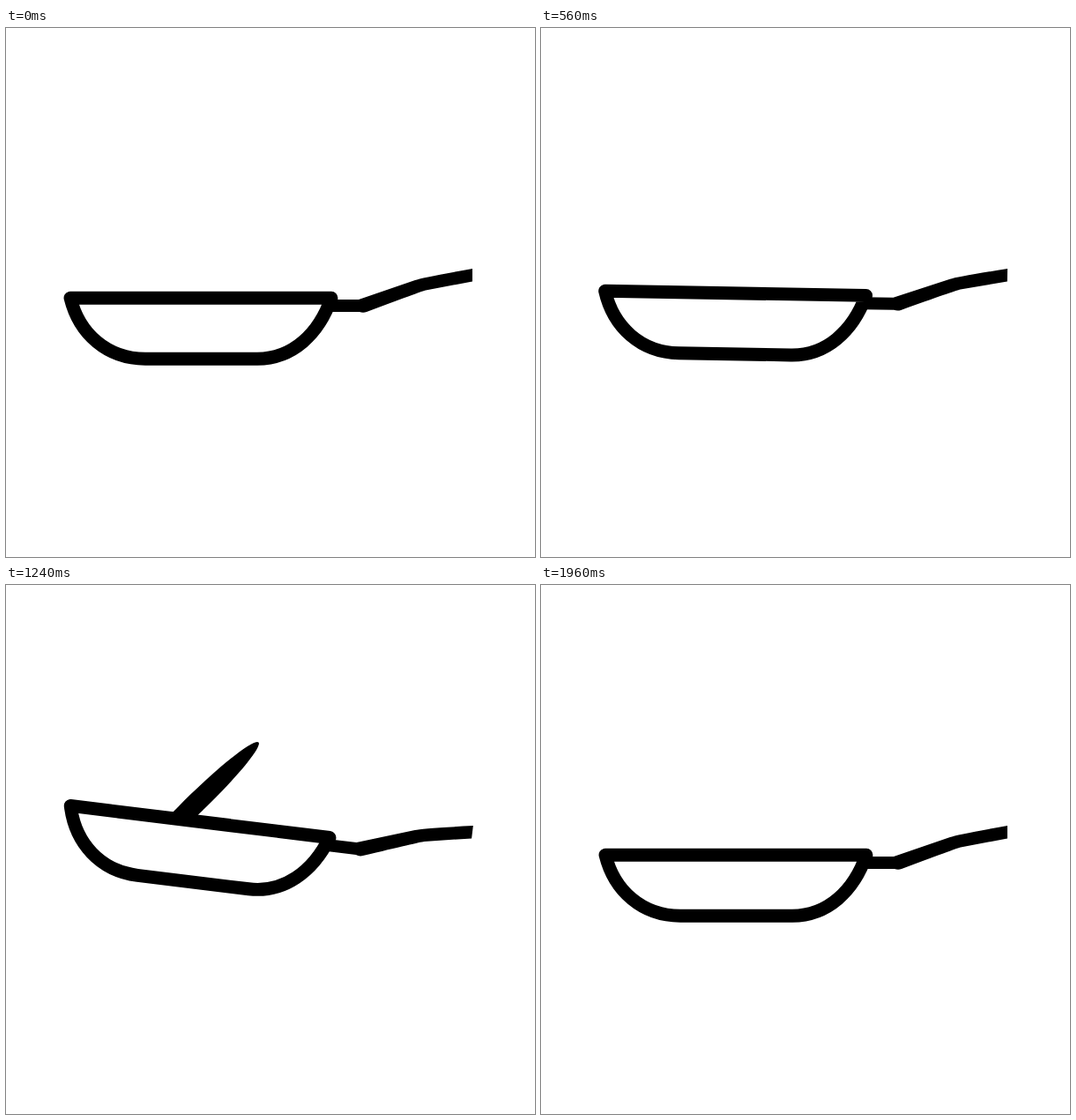
Recreate the animation shown at these times as an HTML page. Size 600x600 px, loop 2 s.

```html
<!DOCTYPE html>
<html lang="en">
<head>
<meta charset="utf-8">
<title>Pan toss</title>
<style>
  html, body { margin: 0; width: 100%; height: 100%; overflow: hidden; background: #fff; }
  svg { display: block; width: 100%; height: 100%; }
</style>
</head>
<body>
<svg viewBox="0 0 600 600">
  <ellipse id="pancake" rx="96.6" ry="11.3"/>
  <g id="pan">
    <path d="M366 308H400L464 286Q472 283 529 273V287.5L476 297.5Q470 299 409 322Q405 323.5 401 322H366Z"/>
    <path d="M73 306.2H369C355 347 325 375.2 285 375.2H158C115 375.2 83 347 73 306.2Z"
          fill="#fff" stroke="#000" stroke-width="14.9" stroke-linejoin="round"/>
  </g>
</svg>
<script>
const LOOP = 2000;
const FRAME = 40;
const DRAWING_RATE = 24; // drawings per second, shown at 25 frames per second

const pan = document.getElementById('pan');
const pancake = document.getElementById('pancake');

// Keys are [drawing, value], joined by straight lines.
const tilt = [[0, 0], [8, -9], [16, 7], [32, 7], [47, 0]];
const flightX = [[16, 220], [24, 196.5], [32, 224]];
const flightY = [[16, 268], [24, 100], [32, 294.3]];
const spin = [[16, 7], [32, 360]];

function valueAt(keys, n) {
  const next = keys.findIndex(([at]) => at > n);
  if (next < 0) return keys[keys.length - 1][1];
  if (next === 0) return keys[0][1];
  const [from, a] = keys[next - 1];
  const [to, b] = keys[next];
  return a + (b - a) * (n - from) / (to - from);
}

function draw(ms) {
  const shownAt = Math.floor((ms % LOOP) / FRAME) * FRAME;
  const n = Math.round(shownAt * DRAWING_RATE / 1000);
  pan.setAttribute('transform', `rotate(${valueAt(tilt, n)} 529 280)`);
  pancake.setAttribute('visibility', n > 16 && n < 32 ? 'visible' : 'hidden');
  pancake.setAttribute('transform',
    `translate(${valueAt(flightX, n)} ${valueAt(flightY, n)}) rotate(${valueAt(spin, n)})`);
}

const start = performance.now();
function tick() {
  draw(performance.now() - start);
  requestAnimationFrame(tick);
}
tick();
</script>
</body>
</html>
```
